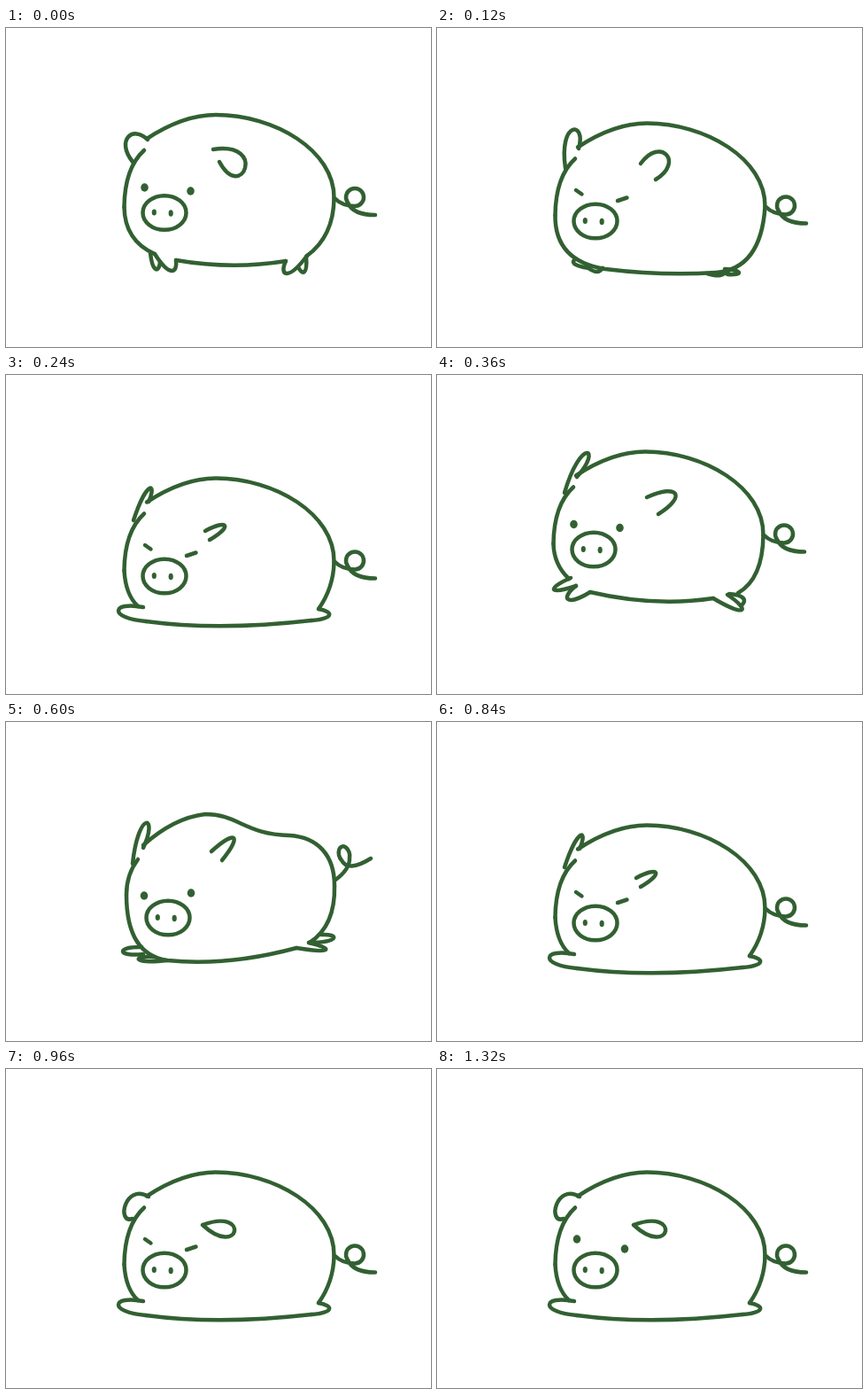
These frames come from a looping animation (480x360 px, 1.92 s). An HTML page with a canvas:

```html
<!DOCTYPE html>
<html lang="en">
<head>
<meta charset="utf-8">
<title>Bouncing piglet</title>
<style>
html, body { margin: 0; width: 100%; height: 100%; overflow: hidden; background: #fff; }
canvas { display: block; }
</style>
</head>
<body>
<canvas id="stage" width="480" height="360"></canvas>
<script>
const ctx = document.getElementById('stage').getContext('2d');
const INK = '#326032';
const LOOP = 1920;

// Back, cheek and tail, which ride up and down with the body.
const SHAPE = `M159,125Q200,98 237,98C303,98 371,138 370.5,192
  M156,138Q134,158 133.5,202
  M371,192Q380,201 394,201A10,10 0 1 0 386,197Q392,211 417,211`;
const EYES = [[156.5, 180], [208.5, 184]];

// at: body offset; under: jaw, flank and belly;
// petals: ears, then feet, each [start, tip, end, bulge].
const stand = {
  at: [0, 0],
  under: 'M133.5,202Q134,240 168,255M370.5,192Q370,235 340,257M192,262Q255,273 316,263',
  petals: [
    [160, 126, 138, 123, 143, 151, 13], [234, 137, 270, 158, 241, 151, 38],
    [163, 253, 169, 272, 174, 264, 4], [168, 255, 187, 274, 192, 262, 5],
    [316, 263, 317, 277, 340, 257, 6], [339, 258, 337, 275, 330, 270, 3]
  ]
};

const crouch = {
  at: [0, 9.5], squint: true,
  under: 'M133.5,211.5Q133,263 190,272Q255,280 315,276Q366,272 370.5,201.5',
  petals: [
    [160, 136, 153, 115, 145, 158, 16], [230, 153, 259, 143, 247, 171, 20],
    [156, 261, 155, 266, 172, 271, 2], [171, 271, 181, 275, 187, 271, 2],
    [305, 277, 320, 279, 331, 273, 2], [325, 272, 341, 276, 328, 278, 3]
  ]
};

const leap = {
  at: [-2, -11.5],
  under: 'M131.5,190.5Q132,214 149,230M368.5,180.5Q368,230 340,246M173,245Q245,262 312,252',
  petals: [
    [158, 115, 169, 88, 144, 133, 14], [237, 138, 269, 134, 250, 157, 9],
    [151, 229, 132, 242, 157, 238, 4], [157, 238, 148, 253, 173, 245, 6],
    [312, 252, 344, 265, 328, 248, 5], [330, 247, 346, 252, 344, 260, 3]
  ]
};

const dive = {
  at: [4, 12.5], eyes: [[156, 196], [209, 193]],
  shape: `M155,139Q190,108 225,104C262,104 270,127 320,128C352,130 371,150 371,185
    M149,155Q136,172 136,195
    M371,179Q389,166 388,153A6,9 -15 1 0 379,156Q386,170 412,154`,
  under: 'M136,195Q136,262 182,269Q250,276 328,255M371,185Q372,230 343,249',
  petals: [
    [155, 142, 158, 114, 143, 160, 12], [232, 146, 257, 131, 244, 156, 5],
    [153, 254, 132, 259, 155, 262, 6], [168, 265, 150, 268, 182, 269, 5],
    [328, 255, 361, 257, 342, 249, 3], [342, 249, 370, 244, 356, 240, 5]
  ]
};

const SOLES = [[155, 262, 127, 266, 158, 278, 10], [353, 264, 365, 271, 345, 277, 4]];

const land = {
  at: [0, 18.5], squint: true,
  under: 'M133.5,220.5Q135,248 149,261M370.5,210.5Q370,240 353,264M158,278Q240,289 345,277',
  petals: [[161, 143, 162, 128, 144, 164, 6], [225, 176, 247, 170, 230, 186, 5], ...SOLES]
};

const flop = {
  ...land,
  petals: [[161, 144, 135, 153, 143, 169, 24], [222, 176, 258, 183, 222, 176, 30], ...SOLES]
};
const rest = { ...flop, squint: false, eyes: [[158, 192], [212, 203]] };

const TIMELINE = [
  [0, stand], [120, crouch], [240, land], [360, leap],
  [600, dive], [840, land], [960, flop], [1320, rest]
];

const line = path => ctx.stroke(new Path2D(path));

// One cubic from start to end that passes the tip halfway.
function petal([x0, y0, tx, ty, x1, y1, bulge]) {
  const cx = (8 * tx - x0 - x1) / 6, cy = (8 * ty - y0 - y1) / 6;
  const ax = cx - (x0 + x1) / 2, ay = cy - (y0 + y1) / 2;
  const side = ax * (y0 - y1) - ay * (x0 - x1) < 0 ? -1 : 1;
  const k = side * bulge / Math.hypot(ax, ay);
  ctx.beginPath();
  ctx.moveTo(x0, y0);
  ctx.bezierCurveTo(cx - ay * k, cy + ax * k, cx + ay * k, cy - ax * k, x1, y1);
  ctx.stroke();
}

function oval(x, y, rx, ry) {
  ctx.beginPath();
  ctx.ellipse(x, y, rx, ry, 0, 0, Math.PI * 2);
}

function dot(x, y, rx, ry) {
  oval(x, y, rx, ry);
  ctx.fill();
}

function drawFace(squint, open) {
  oval(179, 208.5, 24.5, 19.3);
  ctx.stroke();
  dot(167.3, 208, 2.6, 3.5);
  dot(186.2, 209, 2.6, 3.8);
  if (squint) line('M157,173.5L163.5,178M204,185.5L214.5,182');
  else if (open) open.forEach(([x, y]) => dot(x, y, 4.3, 4.7));
}

function drawPig({ at, shape, under, petals, squint, eyes }) {
  ctx.fillStyle = '#fff';
  ctx.fillRect(0, 0, 480, 360);
  ctx.fillStyle = ctx.strokeStyle = INK;
  ctx.lineWidth = 4.5;
  ctx.lineCap = ctx.lineJoin = 'round';

  line(under);
  petals.forEach(petal);
  if (shape) line(shape);
  if (eyes) eyes.forEach(([x, y]) => dot(x, y, 4.3, 4.7));

  ctx.save();
  ctx.translate(...at);
  if (!shape) line(SHAPE);
  drawFace(squint, eyes ? null : EYES);
  ctx.restore();
}

let shown = null;
function tick() {
  const t = performance.now() % LOOP;
  const pose = TIMELINE.filter(([start]) => start <= t).pop()[1];
  if (pose !== shown) drawPig(shown = pose);
  requestAnimationFrame(tick);
}
tick();
</script>
</body>
</html>
```
